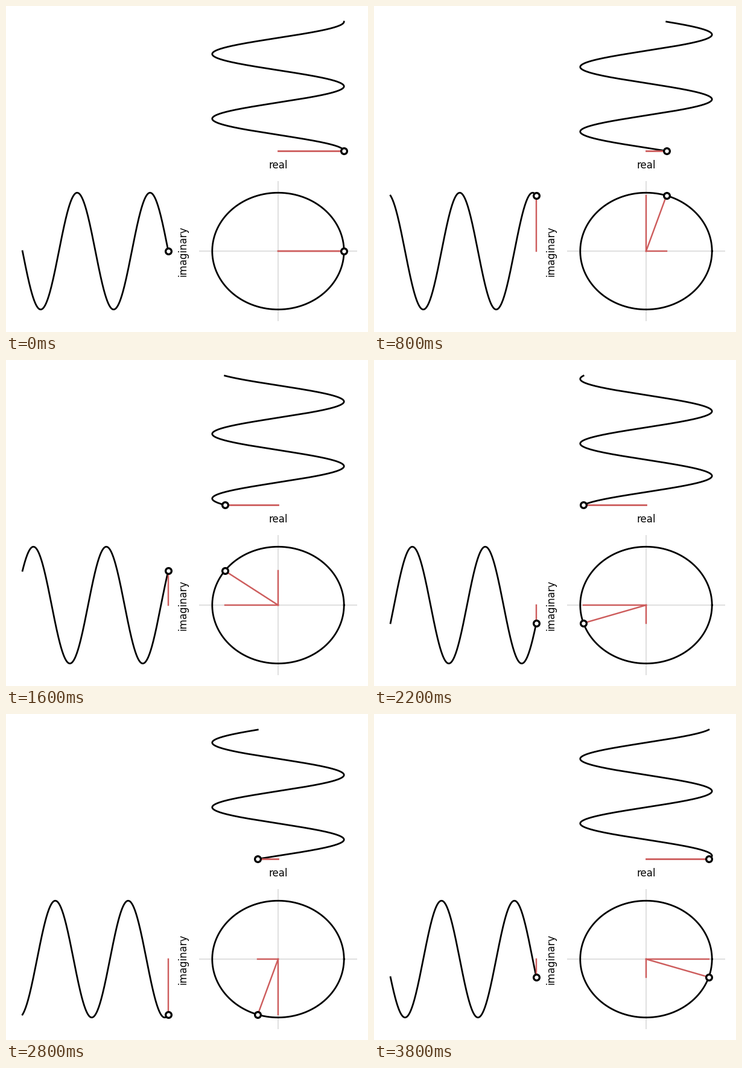
Recreate the animation shown at these times as a matplotlib script. Size 600 px wide and 540 px high, loop 4000 ms.

```python
import numpy as np
import matplotlib.pyplot as plt
from matplotlib.animation import FuncAnimation

W, H, DPI = 600, 540, 100
FRAMES, INTERVAL = 20, 200
CX, CY, RX, RY = 451, 406, 109.2, 96.7
WAVE_LEFT, WAVE_RIGHT = 27.3, 269
WAVE_TOP, WAVE_BOTTOM = 26, 240.2
TURNS = 2
RED, GREY = "indianred", "#e0e0e0"

plt.rcParams["font.family"] = "DejaVu Sans"
fig = plt.figure(figsize=(W / DPI, H / DPI), dpi=DPI, facecolor="white")
ax = fig.add_axes([0, 0, 1, 1])
ax.set_xlim(0, W)
ax.set_ylim(H, 0)
ax.axis("off")


def line(x=(), y=(), color="black", lw=2, z=3, **kw):
    return ax.plot(x, y, color=color, lw=lw, zorder=z, **kw)[0]


def bar(lw=1.75):
    return line(color=RED, lw=lw, z=4)


def dot():
    return line(marker="o", ms=7, mew=2.4, mfc="white", mec="black", z=5)


# Static parts: axes cross, circle, labels
line([CX - 1.2 * RX, CX + 1.2 * RX], [CY, CY], GREY, 1.5, 1, solid_capstyle="butt")
line([CX, CX], [CY - 1.2 * RY, CY + 1.2 * RY], GREY, 1.5, 1, solid_capstyle="butt")
a = np.linspace(0, 2 * np.pi, 400)
line(CX + RX * np.cos(a), CY - RY * np.sin(a))
ax.text(CX, 269, "real", size=12, ha="center", va="baseline")
ax.text(293.5, CY, "imaginary", size=12, rotation=90, ha="center", va="center")

# Moving parts
s = np.linspace(0, 1, 500)
lag = 2 * np.pi * TURNS * s
wave_x = WAVE_RIGHT - (WAVE_RIGHT - WAVE_LEFT) * s
wave_y = WAVE_BOTTOM - (WAVE_BOTTOM - WAVE_TOP) * s

sine, cosine = line(), line()
top_bar = bar(2)
side_bar, real_bar, imag_bar, radius = (bar() for _ in range(4))
top_dot, side_dot, circle_dot = dot(), dot(), dot()


def update(i):
    t = 2 * np.pi * i / FRAMES
    x, y = CX + RX * np.cos(t), CY - RY * np.sin(t)

    sine.set_data(wave_x, CY - RY * np.sin(t + lag))
    cosine.set_data(CX + RX * np.cos(t + lag), wave_y)

    top_bar.set_data([CX, x], [WAVE_BOTTOM] * 2)
    side_bar.set_data([WAVE_RIGHT] * 2, [CY, y])
    real_bar.set_data([CX, x], [CY, CY])
    imag_bar.set_data([CX, CX], [CY, y])
    radius.set_data([CX, x], [CY, y])

    top_dot.set_data([x], [WAVE_BOTTOM])
    side_dot.set_data([WAVE_RIGHT], [y])
    circle_dot.set_data([x], [y])
    return (sine, cosine, top_bar, side_bar, real_bar, imag_bar, radius,
            top_dot, side_dot, circle_dot)


anim = FuncAnimation(fig, update, frames=FRAMES, interval=INTERVAL,
                     repeat=True, repeat_delay=0)
plt.show()
```
